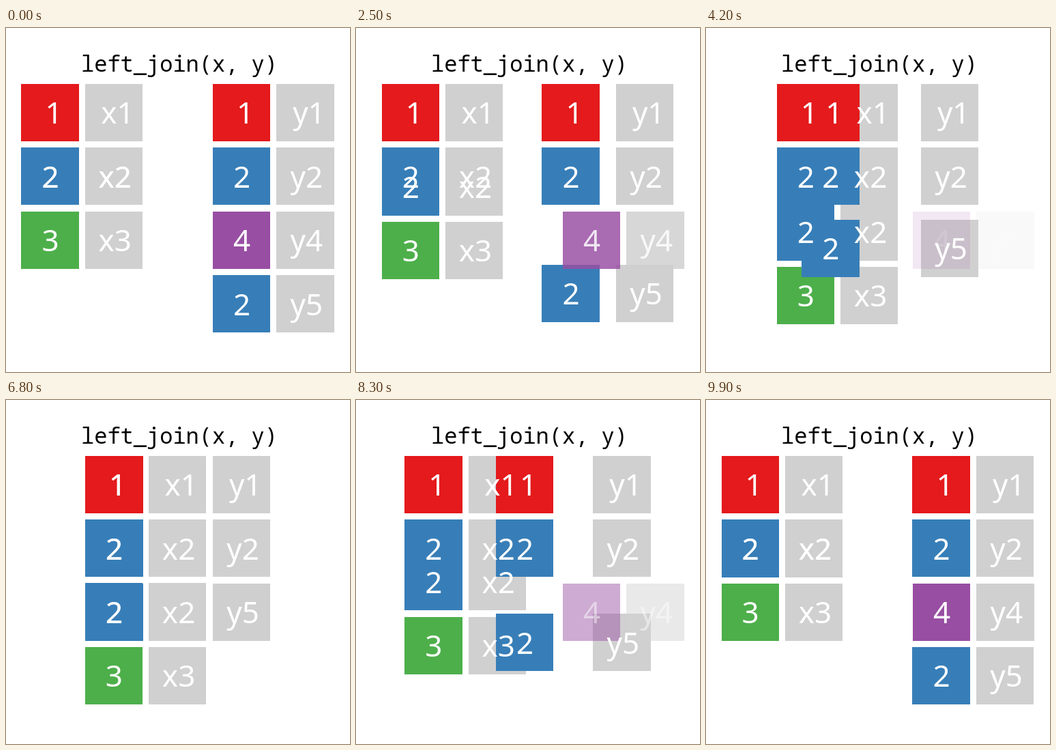
An HTML page that plays this animation: 504 by 504 pixels, repeating every 10000 ms.

```html
<!DOCTYPE html>
<html lang="en">
<head>
<meta charset="utf-8">
<title>left_join(x, y)</title>
<style>
  html, body { margin: 0; width: 100%; height: 100%; overflow: hidden; background: #fff; }
  svg { display: block; width: 504px; height: 504px; }
  rect { shape-rendering: crispEdges; }
  .title { font: 32px "Noto Sans Mono", "DejaVu Sans Mono", monospace; fill: #000; }
  .label { font: 44px "Noto Sans", "Open Sans", sans-serif; fill: #fff; text-anchor: middle; }
</style>
</head>
<body>
<svg viewBox="0 0 504 504">
  <text class="title" x="110" y="64">left_join(x, y)</text>
  <g id="tiles"></g>
  <g id="labels"></g>
</svg>
<script>
  const LEFT = 22.4, TOP = 81.7, PITCH = 93.5, SIZE = 84.2;
  const LOOP = 10000, STEP = 100;
  const COLORS = { 1: '#e41a1c', 2: '#377eb8', 3: '#4daf4a', 4: '#984ea3' };
  const GREY = '#d0d0d0';

  // Columns before and after the join
  const COLS = {
    x: { key: [0, 1], val: [1, 2] },
    y: { key: [3, 1], val: [4, 3] }
  };

  // table, key, value, row before, row after (null: fades out in place)
  const ROWS = [
    ['x', 1, 'x1', 0, 0],
    ['x', 2, 'x2', 1, 1],
    ['x', 2, 'x2', 1, 2],
    ['x', 3, 'x3', 2, 3],
    ['y', 1, 'y1', 0, 0],
    ['y', 2, 'y2', 1, 1],
    ['y', 2, 'y5', 3, 2],
    ['y', 4, 'y4', 2, null]
  ];

  function add(parent, tag, attrs) {
    const el = document.createElementNS('http://www.w3.org/2000/svg', tag);
    for (const name in attrs) el.setAttribute(name, attrs[name]);
    return document.getElementById(parent).appendChild(el);
  }

  function nudge(text) {
    if (text.endsWith('1')) return 5.5;
    return text.length > 1 ? 1.8 : 0.5;
  }

  function makeCell(text, fill, cols, rows) {
    const tile = add('tiles', 'rect', { width: SIZE, height: SIZE, fill });
    const label = add('labels', 'text', { class: 'label', x: SIZE / 2 + nudge(text), y: 58.5 });
    label.textContent = text;
    return { parts: [tile, label], cols, rows };
  }

  const cells = ROWS.flatMap(([table, key, val, from, to]) => [
    makeCell(String(key), COLORS[key], COLS[table].key, [from, to]),
    makeCell(val, GREY, COLS[table].val, [from, to])
  ]);

  const mix = ([a, b], p) => a + (b - a) * p;
  const ease = u => (1 - Math.cos(Math.PI * Math.min(1, Math.max(0, u)))) / 2;

  function progress(t) {
    return t < 6000 ? ease((t - 1600) / 3400) : 1 - ease((t - 6700) / 3300);
  }

  function draw(p) {
    for (const { parts, cols, rows } of cells) {
      const fades = rows[1] === null;
      const x = LEFT + PITCH * (fades ? cols[0] : mix(cols, p));
      const y = TOP + PITCH * (fades ? rows[0] : mix(rows, p));
      for (const el of parts) {
        el.setAttribute('transform', `translate(${x.toFixed(3)} ${y.toFixed(3)})`);
        if (fades) el.setAttribute('opacity', 1 - p);
      }
    }
  }

  function tick() {
    const t = performance.now() % LOOP;
    draw(progress(Math.floor(t / STEP) * STEP));
    requestAnimationFrame(tick);
  }
  tick();
</script>
</body>
</html>
```
